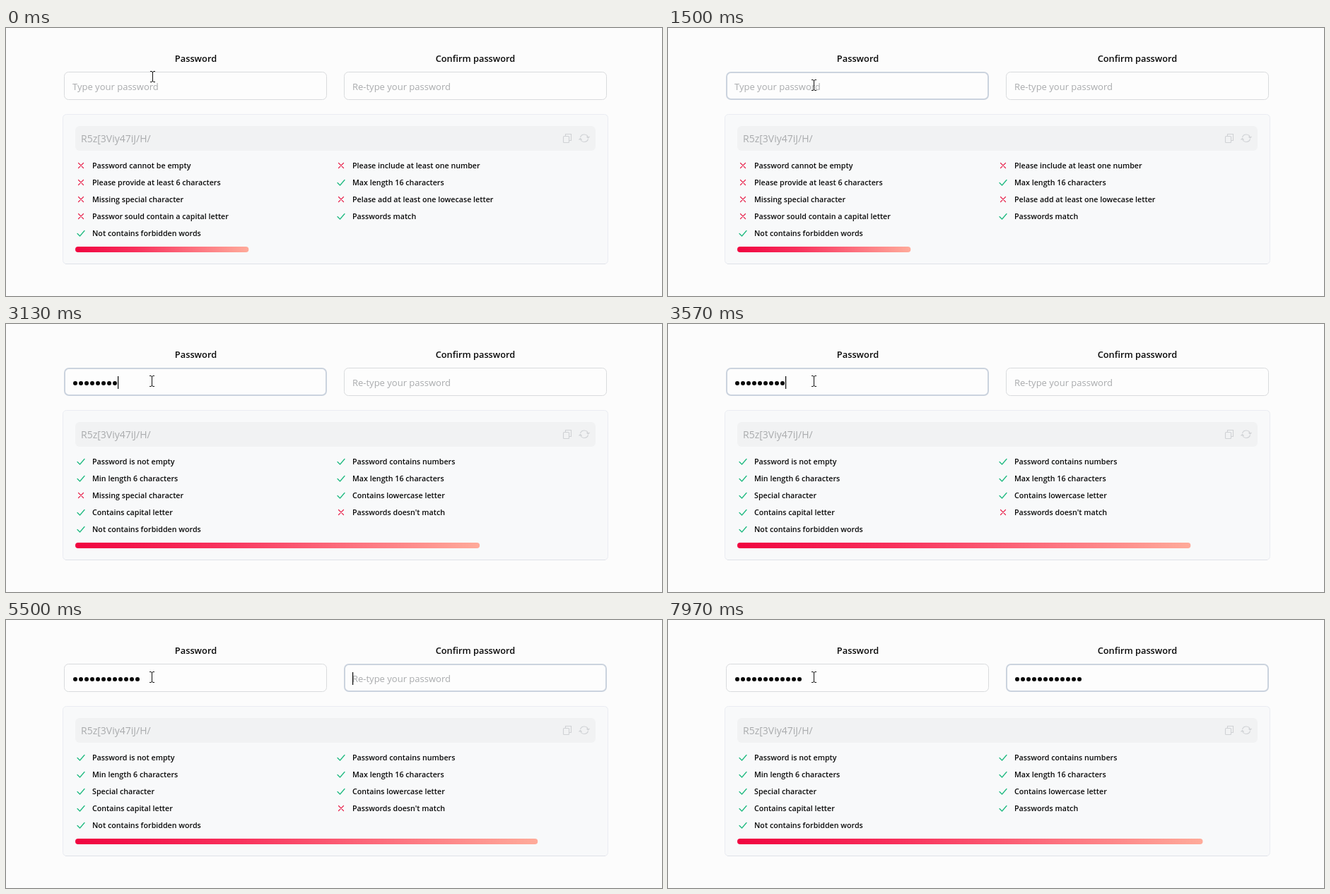
An HTML page that plays this animation: 928 px wide and 380 px high, repeating every 8 s.

```html
<!DOCTYPE html>
<html lang="en">
<head>
<meta charset="utf-8">
<title>Password form</title>
<style>
  html, body { margin: 0; width: 100%; height: 100%; overflow: hidden; background: #fcfcfc; }
  svg { display: block; font: 13px "Open Sans", "Noto Sans", sans-serif; fill: #0a0a0a; }
  .label { font-size: 12.8px; font-weight: 600; text-anchor: middle; }
  .rule { font-size: 10.7px; font-weight: 600; }
  .muted { fill: #a9abad; }
  .sample { font-size: 14px; }
  .field { fill: #fdfdfd; stroke: #d9dbdd; }
  .field.focus { stroke: #cbd3de; stroke-width: 2; }
  .icon { fill: none; stroke: #d0d2d5; stroke-width: 1.1; }
  .mark { fill: none; stroke-width: 1.2; stroke-linecap: round; stroke-linejoin: round; }
  .beam { fill: none; stroke: #111; }
</style>
</head>
<body>
<svg id="stage" width="928" height="380" viewBox="0 0 928 380">
  <defs>
    <linearGradient id="heat">
      <stop offset="0" stop-color="#f00440"/>
      <stop offset=".35" stop-color="#f8315c"/>
      <stop offset=".7" stop-color="#fd7480"/>
      <stop offset="1" stop-color="#ffab9a"/>
    </linearGradient>
  </defs>
  <text class="label" x="268.5" y="48">Password</text>
  <text class="label" x="664" y="48">Confirm password</text>

  <rect x="80.5" y="122.5" width="771" height="212" rx="5" fill="#f8f9fa" stroke="#eaecf2"/>
  <path d="M84 334.5H848" stroke="#dfe2e8"/>
  <rect x="98" y="139" width="736" height="35" rx="6" fill="#f1f2f3"/>
  <text class="muted sample" x="106" y="162">R5z[3Viy47iJ/H/</text>
  <g class="icon">
    <rect x="788.5" y="153.5" width="8" height="9" rx="1"/>
    <path d="M791.5 153V150.5H799.5V159.5H797"/>
    <path d="M812.5 155A5.7 5.7 0 0 1 823.500 155.500M823.500 157.500A5.700 5.700 0 0 1 812.500 157M821.500 154L823.500 156L825.500 154M810.500 158.500L812.500 156.500L814.500 158.500"/>
  </g>
  <rect id="bar" x="98" y="310" height="8" rx="4" fill="url(#heat)"/>
</svg>
<script>
const LOOP = 8000;
const BLINK = 530;
const BAR_EASE = 300;
const BAR_FULL = 736;
const NEVER = Infinity;
const FOCUS = 870, TAB = 4250, MATCHED = 7963;
const typed = [1700, 1850, 1980, 2110, 2240, 2600, 2850, 3130, 3390, 3680, 3900, 4100];
const retyped = [5600, 5800, 6010, 6230, 6440, 6610, 6740, 6870, 7000, 7130, 7260, 7390];

const stage = document.getElementById("stage");
const bar = document.getElementById("bar");

function add(tag, attrs, text = "") {
  const node = document.createElementNS("http://www.w3.org/2000/svg", tag);
  for (const key in attrs) node.setAttribute(key, attrs[key]);
  node.textContent = text;
  return stage.appendChild(node);
}
const show = (node, on) => node.setAttribute("visibility", on ? "visible" : "hidden");

// A rule holds from `pass` on; with `fail`, it also holds before that time.
const rules = [
  [0, 0, "Password cannot be empty", "Password is not empty", typed[0]],
  [0, 1, "Please provide at least 6 characters", "Min length 6 characters", typed[5]],
  [0, 2, "Missing special character", "Special character", typed[8]],
  [0, 3, "Passwor sould contain a capital letter", "Contains capital letter", typed[0]],
  [0, 4, "", "Not contains forbidden words", 0],
  [1, 0, "Please include at least one number", "Password contains numbers", typed[6]],
  [1, 1, "", "Max length 16 characters", 0],
  [1, 2, "Pelase add at least one lowecase letter", "Contains lowercase letter", typed[1]],
  [1, 3, "Passwords doesn't match", "Passwords match", MATCHED, typed[0]],
].map(([col, row, bad, good, pass, fail = 0]) => {
  const x = 98 + col * 368, y = 195 + row * 24;
  return {
    bad, good,
    ok: t => t >= pass || t < fail,
    mark: add("path", { class: "mark", transform: `translate(${x + 8} ${y})` }),
    text: add("text", { class: "rule", x: x + 24, y: y + 4 }),
  };
});

function makeField(x, hint, keys, from, to) {
  const box = add("rect", { class: "field", rx: 6 });
  const placeholder = add("text", { class: "muted", x: x + 12, y: 88 }, hint);
  const dots = keys.map((_, i) => add("circle", { cx: x + 16 + 8 * i, cy: 84, r: 3 }));
  const caret = add("rect", { y: 74, width: 1.2, height: 18 });
  return t => {
    const focused = t >= from && t < to;
    const inset = focused ? 1 : 0.5;
    box.setAttribute("class", focused ? "field focus" : "field");
    box.setAttribute("x", x + inset);
    box.setAttribute("y", 62 + inset);
    box.setAttribute("width", 372 - 2 * inset);
    box.setAttribute("height", 40 - 2 * inset);
    const count = keys.filter(k => k <= t).length;
    show(placeholder, !count);
    dots.forEach((dot, i) => show(dot, i < count));
    const lastKey = count ? keys[count - 1] : from;
    caret.setAttribute("x", x + 12 + 8 * count);
    show(caret, focused && Math.floor((t - lastKey) / BLINK) % 2 === 0);
  };
}
const fields = [
  makeField(82, "Type your password", typed, FOCUS, TAB),
  makeField(478, "Re-type your password", retyped, TAB, NEVER),
];
const pointer = add("path", {
  class: "beam",
  d: "M-3 -7.5H-1L.5 -6.5L2 -7.5H4M.5 -7V7M-3 7.5H-1L.5 6.5L2 7.5H4",
});

const score = t => rules.filter(r => r.ok(t)).length / rules.length * BAR_FULL;
const changes = [...typed, MATCHED].filter(t => score(t) !== score(t - 1));

function barWidth(t) {
  let width = score(0), target = width, start = 0;
  const at = time => {
    const p = Math.min(1, (time - start) / BAR_EASE);
    return width + (target - width) * (1 - (1 - p) ** 2);
  };
  for (const change of changes) {
    if (change > t) break;
    width = at(change);
    target = score(change);
    start = change;
  }
  return at(t);
}

function render(t) {
  fields.forEach(update => update(t));
  for (const { ok, mark, text, good, bad } of rules) {
    const passed = ok(t);
    mark.setAttribute("d", passed ? "M-5 .5L-1.5 4L5 -3.5" : "M-3.5 -3.5L3.5 3.5M3.5 -3.5L-3.5 3.5");
    mark.setAttribute("stroke", passed ? "#18b87c" : "#e8274f");
    text.textContent = passed ? good : bad;
  }
  bar.setAttribute("width", barWidth(t));
  const p = Math.min(1, Math.max(0, (t - 250) / 400));
  const move = p * p * (3 - 2 * p);
  pointer.setAttribute("transform", `translate(${207 - move} ${69 + 12 * move})`);
}

const began = performance.now();
function tick() {
  render((performance.now() - began) % LOOP);
  requestAnimationFrame(tick);
}
tick();
</script>
</body>
</html>
```
